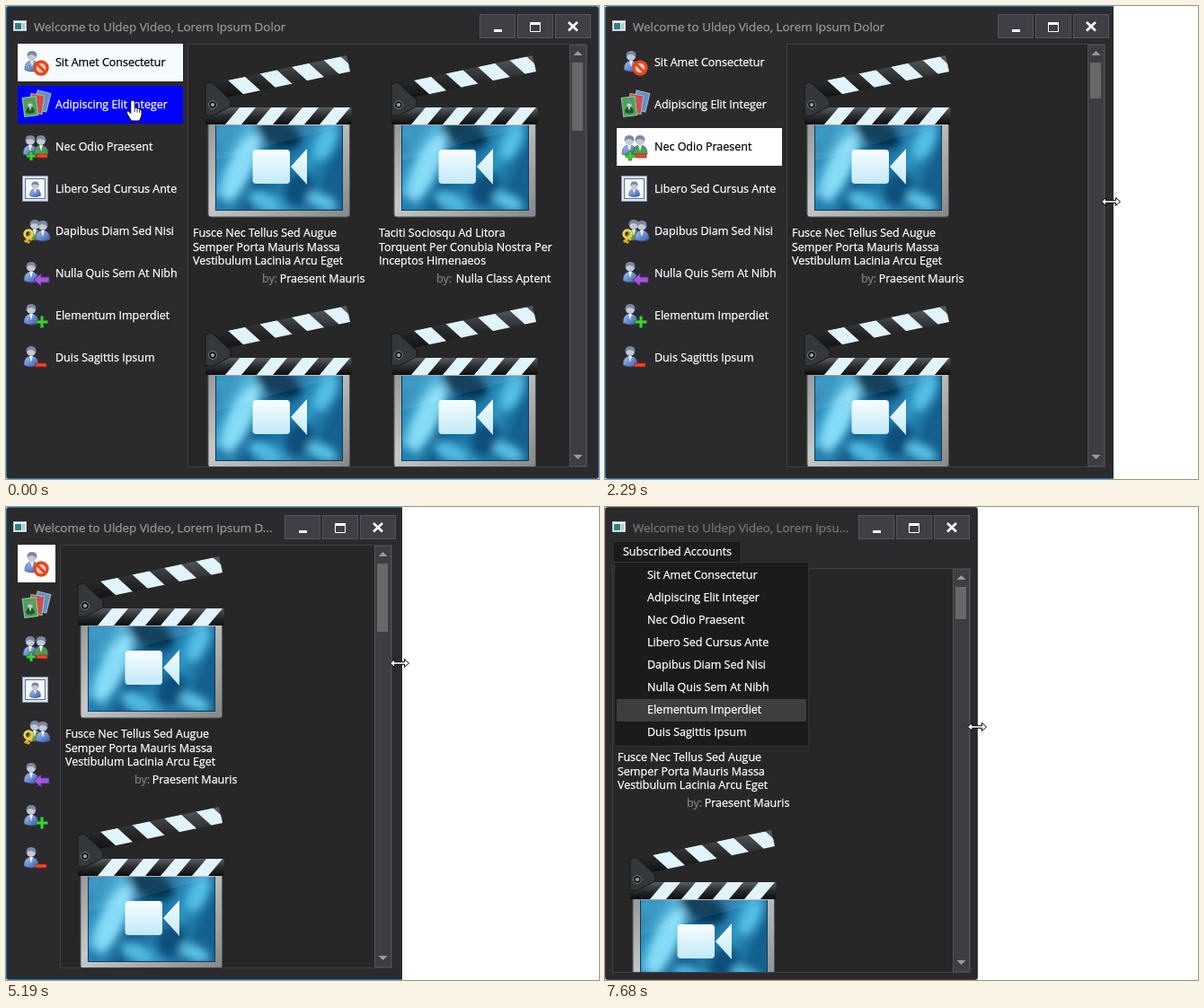
An HTML page for the animation above (8 s loop, 660x527 px).

```html
<!DOCTYPE html>
<html lang="en">
<head>
<meta charset="utf-8">
<title>Adaptive window</title>
<style>
  html, body { margin: 0; width: 100%; height: 100%; overflow: hidden; background: #fff; }
  svg { display: block; width: 660px; height: 527px; }
  text { font: 12.5px "Open Sans", "Noto Sans", sans-serif; color: #fff; fill: currentColor; stroke: currentColor; stroke-width: .25; white-space: pre; }
  .title { font-size: 13.38px; }
</style>
</head>
<body>
<svg viewBox="0 0 660 527">
  <defs>
    <linearGradient id="frame" x2="1" y2="1">
      <stop offset="0" stop-color="#8d9092"/><stop offset=".45" stop-color="#c6c8ca"/><stop offset="1" stop-color="#858789"/>
    </linearGradient>
    <linearGradient id="screen" x2="1" y2=".3">
      <stop offset="0" stop-color="#1a6d9e"/><stop offset=".25" stop-color="#3fa9d4"/><stop offset=".5" stop-color="#125c8c"/>
      <stop offset=".8" stop-color="#2b92c2"/><stop offset="1" stop-color="#14618f"/>
    </linearGradient>
    <linearGradient id="dark" x2="0" y2="1">
      <stop offset="0" stop-color="#5a5e62"/><stop offset=".5" stop-color="#2a2c2e"/><stop offset="1" stop-color="#0c0d0e"/>
    </linearGradient>
    <linearGradient id="lens" x2="0" y2="1">
      <stop offset="0" stop-color="#f8fdff"/><stop offset="1" stop-color="#c2e9f9"/>
    </linearGradient>
    <linearGradient id="coat" x2="1" y2="1">
      <stop offset="0" stop-color="#a9c6f5"/><stop offset="1" stop-color="#3358a8"/>
    </linearGradient>
    <filter id="soft"><feGaussianBlur stdDeviation="5"/></filter>
    <clipPath id="glass"><path d="M234 133H374V227H234z"/></clipPath>
    <clipPath id="arm"><path d="M222 88L379 55L383 73L222 107z"/></clipPath>
    <clipPath id="bar"><path d="M222 113H385V132H222z"/></clipPath>
    <clipPath id="edge"><rect id="edgeBox" height="527"/></clipPath>
    <clipPath id="list"><rect id="listBox"/></clipPath>
    <g id="clap"></g>
  </defs>
  <g clip-path="url(#edge)"><g id="win"></g></g>
  <g id="cursor" stroke-linejoin="round"></g>
</svg>
<script>
const LOOP = 8000;
const $ = id => document.getElementById(id);
const TITLE = 'Welcome to Uldep Video, Lorem Ipsum Dolor';
const ITEMS = ['Sit Amet Consectetur', 'Adipiscing Elit Integer', 'Nec Odio Praesent', 'Libero Sed Cursus Ante',
  'Dapibus Diam Sed Nisi', 'Nulla Quis Sem At Nibh', 'Elementum Imperdiet', 'Duis Sagittis Ipsum'];
const VIDEOS = [
  { lines: ['Fusce Nec Tellus Sed Augue', 'Semper Porta Mauris Massa', 'Vestibulum Lacinia Arcu Eget'], by: 'Praesent Mauris', byX: 285 },
  { lines: ['Taciti Sociosqu Ad Litora', 'Torquent Per Conubia Nostra Per', 'Inceptos Himenaeos'], by: 'Nulla Class Aptent', byX: 272 }
];

// Pointer tip (or middle of the resize arrow): time, x, y
const PATH = [
  [30, 141, 105], [110, 131, 124], [390, 131, 124], [560, 131, 190], [700, 131, 190], [750, 120, 165],
  [930, 120, 165], [1080, 300, 225], [1240, 620, 247], [1600, 676, 219], [1630, 666, 219], [1810, 658, 219],
  [2040, 658, 217], [2450, 544, 218], [2690, 544, 218], [2820, 549, 218], [2960, 549, 218], [3000, 500, 220],
  [3180, 200, 180], [3380, 22, 112], [3650, 22, 112], [3850, 16, 55], [4030, 16, 55], [4400, 574, 177],
  [4550, 570, 176], [4750, 542, 174], [5430, 414, 174], [5610, 414, 174], [5870, 92, 48], [5950, 92, 48],
  [6080, 92, 126], [6190, 92, 124], [6220, 92, 48], [6400, 92, 48], [6700, 110, 250], [6850, 120, 226],
  [7000, 232, 233], [7170, 384, 273], [7210, 384, 273], [7430, 453, 274], [7680, 414, 245]
];
// Right edge of the window: time, x
const EDGE = [[2010, 660], [2040, 644], [2250, 570], [2450, 545], [4950, 545], [5040, 505], [5160, 443], [5190, 441], [5430, 415]];

function track(keys, t) {
  if (t <= keys[0][0]) return keys[0].slice(1);
  for (let i = 1; i < keys.length; i++) {
    const a = keys[i - 1], b = keys[i];
    if (t < b[0]) return b.slice(1).map((v, k) => a[k + 1] + (v - a[k + 1]) * (t - a[0]) / (b[0] - a[0]));
  }
  return keys[keys.length - 1].slice(1);
}

const rect = (x, y, w, h, fill, more = '') => `<rect x="${x}" y="${y}" width="${w}" height="${h}" fill="${fill}" ${more}/>`;
const path = (d, fill, more = '') => `<path d="${d}" fill="${fill}" ${more}/>`;
const blob = (x, y, rx, ry, fill) => `<ellipse cx="${x}" cy="${y}" rx="${rx}" ry="${ry}" fill="${fill}" transform="rotate(25 ${x} ${y})"/>`;
const text = (x, y, s, more = '') => `<text x="${x}" y="${y}" ${more}>${s}</text>`;
const at = (x, y, body, more = '') => `<g transform="translate(${x} ${y}) ${more}">${body}</g>`;
const framed = (x, y, w, h, fill, line) => rect(x + .5, y + .5, w - 1, h - 1, fill, `stroke="${line}"`);

function clapper() {
  let arm = '', bar = '';
  for (let i = 0; i < 4; i++) {
    arm += path(`M${247 + 35.5 * i} 0h19l18 20h-19z`, '#e2f4fb');
    bar += path(`M${244 + 35 * i} 132h18l16 -19h-18z`, '#e2f4fb');
  }
  return rect(225, 114, 157.5, 121, 'url(#frame)', 'rx="3" stroke="#55585a"')
    + rect(233, 133, 142, 95, '#12384f')
    + `<g clip-path="url(#glass)">${rect(234, 133, 140, 94, 'url(#screen)')}<g filter="url(#soft)">`
    + blob(261, 180, 13, 42, '#86dcf6') + blob(304, 142, 26, 14, '#06314f')
    + blob(240, 140, 10, 12, '#2b93c2') + blob(238, 222, 14, 10, '#1d80b2')
    + blob(288, 218, 20, 10, '#4fb9e0') + blob(326, 204, 16, 20, '#0c4f7d')
    + blob(356, 152, 10, 22, '#55bfe6') + blob(352, 218, 18, 9, '#58c0e4') + '</g>'
    + path('M234 133H374L234 172z', '#fff', 'opacity=".08"') + '</g>'
    + rect(222, 113, 162.5, 19, 'url(#dark)', 'rx="1"') + `<g clip-path="url(#bar)">${bar}</g>`
    + path('M222 88L379 55L383 73L222 107z', 'url(#dark)')
    + `<g clip-path="url(#arm)"><g transform="matrix(1 -.21 0 1 0 134.6)">${arm}</g></g>`
    + path('M222 87l7 -2l21 20v7l-20 10l-8 0z', '#34383b', 'stroke="#15171a"')
    + '<circle cx="230" cy="110" r="4.5" fill="#17191b" stroke="#777b7e"/><circle cx="230" cy="110" r="2" fill="#a2a5a8"/>'
    + rect(274.5, 160, 41.5, 38, 'url(#lens)', 'rx="4"') + path('M317 179L335 159V199z', 'url(#lens)');
}

const person = (x, y, coat = 'url(#coat)', s = 1) => at(x, y,
  path('M-8 11q0 -10 8 -10t8 10q-8 4 -16 0z', coat, 'stroke="#40507c" stroke-width=".7"')
  + path('M-2 1l2 7l2 -7z', '#eef4ff')
  + '<circle cy="-4" r="5" fill="#c3c9d6"/>' + path('M-5.3 -3q-1 -7 5.3 -7t5.3 7q-3 -3 -6 -3t-4.6 3z', '#7c87a0'), `scale(${s})`);
const minus = (x, y) => rect(x - 6, y - 2, 12, 4, '#f0452c', 'stroke="#a31c10" stroke-width=".7"');
const plus = (x, y, r) => path(`M${x - 1.7} ${y - r}h3.4v${r - 1.7}h${r - 1.7}v3.4h${1.7 - r}v${r - 1.7}h-3.4v${1.7 - r}h${1.7 - r}v-3.4h${r - 1.7}z`,
  '#45cf3a', 'stroke="#177a14" stroke-width=".7"');
const photo = (x, y, turn, fill) => at(x, y, rect(-7.5, -10.5, 15, 21, fill, 'stroke="#a3b5ac" stroke-width="1.2"'), `rotate(${turn})`);
const pair = person(-6, -3) + person(6, -3, '#4d9a55');

const ICONS = [
  person(-4, -3) + '<circle cx="6" cy="6" r="7" fill="#f6c9b0" stroke="#e4461f" stroke-width="3.4"/>'
    + path('M1.5 1.5l9 9', 'none', 'stroke="#e4461f" stroke-width="3"'),
  photo(7, -4, 14, '#5f8ed0') + photo(1, -1, 8, '#d14c4c') + photo(-6, 2, -7, '#43a84e') + person(-6, 2, '#20552b', .6),
  pair + plus(-5, 10, 5) + minus(7, 10),
  framed(-15, -15, 29, 29, '#dde6f2', '#8b9ab0') + framed(-12, -12, 23, 23, '#f5f9ff', '#5b7099') + person(-.5, -1, 'url(#coat)', .75),
  person(-1, -3, '#5f9a4d') + person(8, -2)
    + path('M-4 4L-12 12M-10 10l3 3M-7 7l3 3', 'none', 'stroke="#d9ad27" stroke-width="3"')
    + '<circle cx="-8" cy="3" r="4.2" fill="none" stroke="#f0cf4c" stroke-width="3"/>',
  person(-5, -3) + path('M-2 7l8 -7v4h9v6h-9v4z', '#a05ad6', 'stroke="#5f2a94"'),
  person(-5, -3) + plus(7, 7, 6.5),
  person(-5, -3) + minus(6, 8)
];

const POINTERS = {
  hand: path('M-2.2 2Q-2 -.3 0 0Q2 -.3 2.2 2V8.5Q4 7.6 5 9.2Q7 8.6 7.6 10.2Q10 9.8 10 12.5V17L7.5 23H-1.5L-6.3 15Q-7 11.5 -4.4 12.2L-2.2 14.5z', '#fff', 'stroke="#000"')
    + path('M2.2 9v4M5 10v3.5M7.6 11v3', 'none', 'stroke="#000" stroke-width=".8"'),
  arrow: path('M.5 .5V16L4.2 12.5L6.6 18.4L9.2 17.3L6.7 11.6H11.8z', '#fff', 'stroke="#000"'),
  resize: path('M-10.5 0L-5.5 -4.5V-1.3H5.5V-4.5L10.5 0L5.5 4.5V1.3H-5.5V4.5z', '#fff', 'stroke="#000"')
};

const probe = document.createElementNS('http://www.w3.org/2000/svg', 'text');
probe.setAttribute('class', 'title');
probe.setAttribute('visibility', 'hidden');
document.querySelector('svg').append(probe);
const fitted = {};
function fitTitle(max) {
  const key = Math.round(max);
  if (fitted[key]) return fitted[key];
  let s = TITLE;
  for (let n = TITLE.length; n > 0; n--) {
    s = n === TITLE.length ? TITLE : TITLE.slice(0, n) + '...';
    probe.textContent = s;
    if (probe.getComputedTextLength() <= max) break;
  }
  probe.textContent = '';
  return fitted[key] = s;
}

function caption(w, active) {
  const b = w - 133;
  const glyphs = [
    rect(b + 16, 26, 9, 3, '#fff'),
    path(`M${b + 56.5} 19V28.5H${b + 67.5}V19`, 'none', 'stroke="#fff"') + rect(b + 56, 18, 12, 3, '#fff'),
    path(`M${b + 99} 18l10 9.5m0 -9.5l-10 9.5`, 'none', 'stroke="#fff" stroke-width="2.6"')
  ];
  return framed(8, 16, 15, 12, '#eef3f3', '#b8c4c6') + rect(10, 19, 7, 7, '#2f7f83') + rect(18, 19, 3, 7, '#a9c9ca')
    + text(31, 28, fitTitle(b - 38), `class="title" style="color:${active ? '#999' : '#77777a'}"`)
    + glyphs.map((g, i) => framed(b + 42 * i, 9, 40, 27, '#3f3f46', '#55555c') + g).join('');
}

function sidebar(wide, chosen, hover, t) {
  return ITEMS.map((name, i) => {
    const y = 42 + 47 * i, on = i === chosen;
    const fill = on ? (t < 390 ? '#f5fbff' : '#fff') : i === hover ? '#00f' : 'none';
    return rect(13, y, wide ? 184 : 42, 42, fill) + at(33, y + 21, ICONS[i])
      + (wide ? text(55, y + 25, name, on ? 'style="color:#000"' : '') : '');
  }).join('');
}

function content(left, top, right, bottom, cols, thumb) {
  let cells = '';
  for (let r = 0; r < 2; r++) for (let c = 0; c < cols; c++) {
    const v = VIDEOS[c];
    cells += at(left - 202 + 207 * c, top - 42 + 279 * r, '<use href="#clap"/>'
      + v.lines.map((s, i) => text(208, 257 + 15.5 * i, s)).join('')
      + text(v.byX, 308, 'by:', 'style="color:#808080"') + text(399.5, 308, v.by, 'text-anchor="end"'));
  }
  const s = right - 20, m = s + 9.5;
  return framed(left, top, right - left, bottom - top, '#272728', '#3f3f46')
    + `<g clip-path="url(#list)">${cells}</g>`
    + framed(s, top + 1, 19, bottom - top - 2, '#3e3e42', '#505057')
    + path(`M${m - 5} ${top + 13}l5 -5l5 5zM${m - 5} ${bottom - 14}l5 5l5 -5z`, '#99999b')
    + rect(s + 3, top + 21, 12, thumb, '#68686a');
}

function popup(hot) {
  return rect(10, 39, 140, 23, '#1b1b1c') + text(20, 54, 'Subscribed Accounts')
    + framed(10, 61, 217, 206, '#1b1b1c', '#333337')
    + ITEMS.map((s, i) => (i === hot ? rect(13, 64 + 25 * i, 211, 25, '#3e3e40') : '') + text(47, 80 + 25 * i, s)).join('');
}

const set = (id, attrs) => { for (const k in attrs) $(id).setAttribute(k, attrs[k]); };
let lastWin = '', lastKind = '';

function render(t) {
  const tick = Math.floor(t / 30) * 30;
  const edge = Math.round(track(EDGE, tick)[0]);
  const w = Math.round(track(EDGE, tick - 30)[0]); // layout trails the edge by one tick
  const wide = t < 2690, menu = t >= 5610, open = t >= 5950;

  let [x, y] = track(PATH, t);
  if ((t >= 2040 && t < 2450) || (t >= 4980 && t < 5430)) x = edge - 3;
  const row = Math.floor((y - 42) / 47);
  const over = !menu && x >= 8 && x < (wide ? 197 : 55) && row >= 0 && row < 8;
  const kind = Math.abs(x - edge) < 9 ? 'resize' : over ? 'hand' : 'arrow';

  const chosen = t < 390 ? 0 : t < 930 ? 1 : t < 3800 ? 2 : 0;
  const left = menu ? 8 : wide ? 202 : 60, top = menu ? 68 : 42;
  const right = menu ? w - 8 : w - 13, bottom = menu ? 519 : 514;
  const cols = right - 20 - left >= 414 ? 2 : 1;
  const thumb = menu ? 36 : (t >= 2100 && t < 2740) || t >= 5220 ? 40 : 76;
  const line = Math.floor((y - 64) / 25);
  const hot = t < 6100 ? line : t < 6400 || y < 64 ? 2 : x < 227 ? line : 6;

  set('edgeBox', { width: edge });
  set('listBox', { x: left + 1, y: top + 1, width: right - left - 21, height: bottom - top - 2 });
  const html = rect(.5, .5, w - 1, 526, '#2b2b2d', `rx="2" stroke="${open ? '#3f3f46' : '#007acc'}"`)
    + caption(w, !open)
    + (menu ? text(20, 54, 'Subscribed Accounts') : sidebar(wide, chosen, over ? row : -1, t))
    + content(left, top, right, bottom, cols, thumb)
    + (open ? popup(hot) : '');
  if (html !== lastWin) $('win').innerHTML = lastWin = html;
  if (kind !== lastKind) $('cursor').innerHTML = POINTERS[lastKind = kind];
  set('cursor', {
    transform: `translate(${Math.round(x)} ${Math.round(y)})`,
    visibility: t >= 1250 && t < 1630 ? 'hidden' : 'visible'
  });
}

$('clap').innerHTML = clapper();
const start = performance.now();
function frame() {
  render((performance.now() - start) % LOOP);
  requestAnimationFrame(frame);
}
frame();
</script>
</body>
</html>
```
